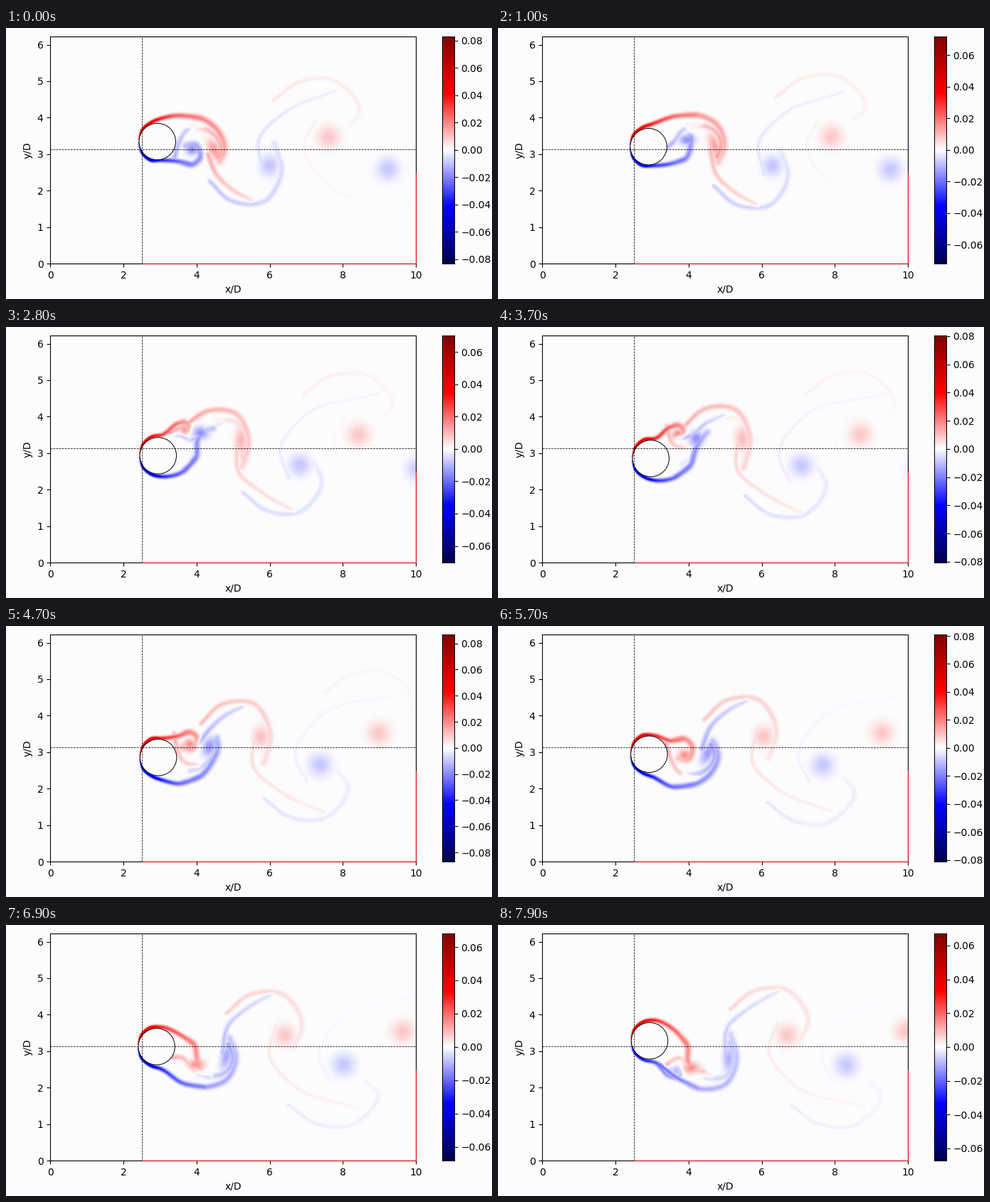
Recreate the animation shown at these times as a matplotlib script. Size 683x382 px, loop 8 s.

```python
import numpy as np
import matplotlib.pyplot as plt
from matplotlib.animation import FuncAnimation
from matplotlib.colors import ListedColormap
from matplotlib.patches import Circle

W, H, DPI = 683, 382, 100
FRAMES, STEP = 80, 100
LEFT, RIGHT, TOP, BOTTOM = 62.2, 576.2, 11.7, 332.0
UNIT = (RIGHT - LEFT) / 10
BG = "#fcfcfe"
HALF_CYCLE = 5500   # ms between two shed vortices
MID = 175           # line about which the two sides mirror

plt.rcParams.update({"font.family": "DejaVu Sans", "font.size": 10})


def hermite(knots, vals, q):
    """Smooth curve through vals at knots, extended linearly past the ends."""
    tan = np.gradient(vals, knots, axis=0)
    q = np.atleast_1d(q)
    inside = np.clip(q, knots[0], knots[-1])
    i = np.clip(np.searchsorted(knots, inside, side="right") - 1,
                0, len(knots) - 2)
    h = (knots[i + 1] - knots[i])[:, None]
    u = (inside - knots[i])[:, None] / h
    past = (q - inside)[:, None] * np.where((q < knots[0])[:, None],
                                            tan[0], tan[-1])
    return ((1 + 2 * u) * (1 - u) ** 2 * vals[i] + u * (1 - u) ** 2 * h * tan[i]
            + u * u * (3 - 2 * u) * vals[i + 1]
            + u * u * (u - 1) * h * tan[i + 1] + past)


def smooth(a, b, x):
    u = np.clip((x - a) / (b - a), 0, 1)
    return u * u * (3 - 2 * u)


def bell(x, w):
    return np.exp(-(x / w) ** 2)


# ---- life of one vortex; age in half cycles, up = away from the midline ---
AGES = np.array([-.4, 0, .4, 1, 1.7, 2.4])
CORE = np.array([(251, 30), (262, -4), (271, -26), (293, 3), (346, 17),
                 (404, 19)], float)


def newborn_first(rows):
    """Shapes around the core; the youngest is the first one at half size."""
    rows = np.array(rows, float)
    return np.vstack([.5 * rows[:1], rows])


ROLL = newborn_first([
    (-18, 17, 0, 21, 11, 11, 4, -6, -10, -4),
    (-22, 50, -5, 30, -4, 8, 4, -3, 15, -6),
    (-48, 48, -16, 43, 6, 25, 14, 0, 7, -16),
    (-82, 18, -55, 42, -10, 42, 11, 0, 2, -40),
    (-80, 36, -48, 61, 0, 62, 28, 18, 16, -10)])
TAIL = newborn_first([
    (-26, 16, -20, -5, -9, -25, 16, -32),
    (-34, 6, -18, 14, 2, -2, 27, -11),
    (-9, -6, 3, -34, 26, -56, 53, -71),
    (-6, 4, -8, -42, 27, -74, 83, -104),
    (-14, 16, -25, -22, 8, -68, 108, -101)])

XS = np.arange(LEFT, RIGHT - .5) + .5
YS = np.arange(TOP, BOTTOM - .5) + .5


def window(x, y, r):
    x0, x1 = np.clip([x - LEFT - r, x - LEFT + r + 1], 0, len(XS)).astype(int)
    y0, y1 = np.clip([y - TOP - r, y - TOP + r + 1], 0, len(YS)).astype(int)
    return slice(y0, y1), slice(x0, x1)


def draw_strand(layer, pts, width, amp):
    nodes = np.column_stack([pts, width, amp])
    gaps = np.hypot(*np.diff(pts, axis=0).T) + .1
    knots = np.concatenate([[0], np.cumsum(gaps)])
    for x, y, w, a in hermite(knots, nodes, np.arange(0, knots[-1], 1.3)):
        w = max(w, .8)
        rows, cols = window(x, y, 3 * w + 1)
        gx = np.exp(-.5 * ((XS[cols] - x) / w) ** 2)
        gy = np.exp(-.5 * ((YS[rows] - y) / w) ** 2)
        part = layer[rows, cols]
        np.maximum(part, a * gy[:, None] * gx, out=part)


def draw_core(layer, pos, side, age, amp):
    size = min(6 + 2 * age, 11.5)
    stretch = np.exp(.45 * bell(age - 1.3, .5) - .25 * bell(age - .3, .3))
    tilt = .5 * bell(age - 1, .3)
    rows, cols = window(*pos, 3.2 * size * max(stretch, 1 / stretch))
    dx = XS[cols] - pos[0]
    dy = side * (pos[1] - YS[rows][:, None])
    c, s = np.cos(tilt), np.sin(tilt)
    u = (dx * c + dy * s) / (size / stretch)
    v = (dy * c - dx * s) / (size * stretch)
    part = layer[rows, cols]
    np.maximum(part, amp * np.exp(-.5 * (u * u + v * v)), out=part)


def draw_vortex(layer, side, age, cyl):
    born = smooth(-.8, -.4, age)
    if born == 0:
        return
    flip = np.array([1, -side])
    young = max(age, AGES[0])
    core = np.array([0, MID]) + flip * hermite(AGES, CORE, young)[0]

    def around(shape, oldest):
        rel = hermite(AGES, shape, min(young, oldest))[0]
        return core + flip * rel.reshape(-1, 2)

    draw_core(layer, core, side, young,
              born * (.11 + .11 / (1 + np.exp(4 * (age - 1.3)))))

    fade = born * np.exp(-.85 * max(age - 1, 0))
    if fade < .08:
        return
    roll = around(ROLL, 3.2)
    spread = .75 + .25 * fade
    draw_strand(layer, roll, spread * np.linspace(2.6, 4, 5),
                fade * np.linspace(.27, .13, 5))
    draw_strand(layer, around(TAIL, 2.8), spread * np.linspace(2.8, 2.4, 4),
                fade * np.linspace(.16, .07, 4))
    inner = bell(age - 1.1, .45)
    if inner > .1:
        draw_strand(layer, core + .65 * (roll - core), np.full(5, 3),
                    inner * np.linspace(.1, .2, 5))

    # shear layer that still ties the sheet to the cylinder
    tie = born * (1 - smooth(1.35, 1.65, age))
    if tie > 0:
        lift = 3 - 3 * np.cos(np.pi * age)
        wall = cyl + flip * np.array([(-26, 0), (-21, 16), (-9, 26),
                                      (6, 26 + lift)])
        draw_strand(layer, np.vstack([wall, roll[:2]]),
                    np.linspace(1, 2.8, 6),
                    tie * np.array([.35, .7, .62, .45, .3, .24]))


def vorticity(phase, cyl):
    layers = {s: np.zeros((len(YS), len(XS))) for s in (1, -1)}
    for k in range(-2, 5):
        side = 1 if k % 2 else -1
        draw_vortex(layers[side], side, phase + k, cyl)
    return layers[1] - layers[-1]


def cylinder(phase):
    return np.array([213.2 + 1.6 * np.cos(2 * np.pi * (phase - .7)),
                     171 + 14.9 * np.cos(np.pi * (phase - .763))])


# ---- figure ---------------------------------------------------------------
def box(x0, y0, x1, y1):
    return [x0 / W, 1 - y1 / H, (x1 - x0) / W, (y1 - y0) / H]


base = plt.get_cmap("seismic")(np.linspace(0, 1, 256))
cmap = ListedColormap(np.minimum(base, [252 / 255, 252 / 255, 254 / 255, 1]))

fig = plt.figure(figsize=(W / DPI, H / DPI), dpi=DPI, facecolor=BG)
ax = fig.add_axes(box(LEFT, TOP, RIGHT, BOTTOM), facecolor=BG)
top = (BOTTOM - TOP) / UNIT
image = ax.imshow(np.zeros((len(YS), len(XS))), cmap=cmap, vmin=-1, vmax=1,
                  extent=(0, 10, 0, top), aspect="auto",
                  interpolation="nearest")
ax.set(xlim=(0, 10), ylim=(0, top), xticks=range(0, 11, 2), yticks=range(7),
       xlabel="x/D", ylabel="y/D")
ax.axvline(2.5, color="k", lw=.55, ls="--")
ax.axhline(3.14, color="k", lw=.55, ls="--")
disc = ax.add_patch(Circle((0, 0), .5, fc=BG, ec="k", lw=.7))
ax.plot([2.5, 10, 10], [0, 0, 2.5], color="#e01010", lw=.8, clip_on=False,
        zorder=5)

bar = fig.add_axes(box(613.2, TOP, 629.8, BOTTOM))
bar.imshow(np.linspace(-1, 1, 256)[:, None], cmap=cmap, vmin=-1, vmax=1,
           extent=(0, 1, -1, 1), origin="lower", aspect="auto")
bar.set_xticks([])
bar.yaxis.tick_right()


def update(i):
    phase = i * STEP / HALF_CYCLE
    cyl = cylinder(phase)
    image.set_data(vorticity(phase, cyl))
    disc.center = (cyl[0] - LEFT) / UNIT, (BOTTOM - cyl[1]) / UNIT
    vmax = .0765 + .0105 * np.cos(2 * np.pi * (phase - .86))
    ticks = [k * .02 for k in range(-4, 5) if abs(k) * .02 <= vmax]
    bar.set_yticks([v / vmax for v in ticks],
                   [f"{v:.2f}".replace("-", "\u2212") for v in ticks])
    bar.set_ylim(-1, 1)
    return image, disc


anim = FuncAnimation(fig, update, frames=FRAMES, interval=STEP, repeat=True,
                     repeat_delay=0, blit=False)
plt.show()
```
